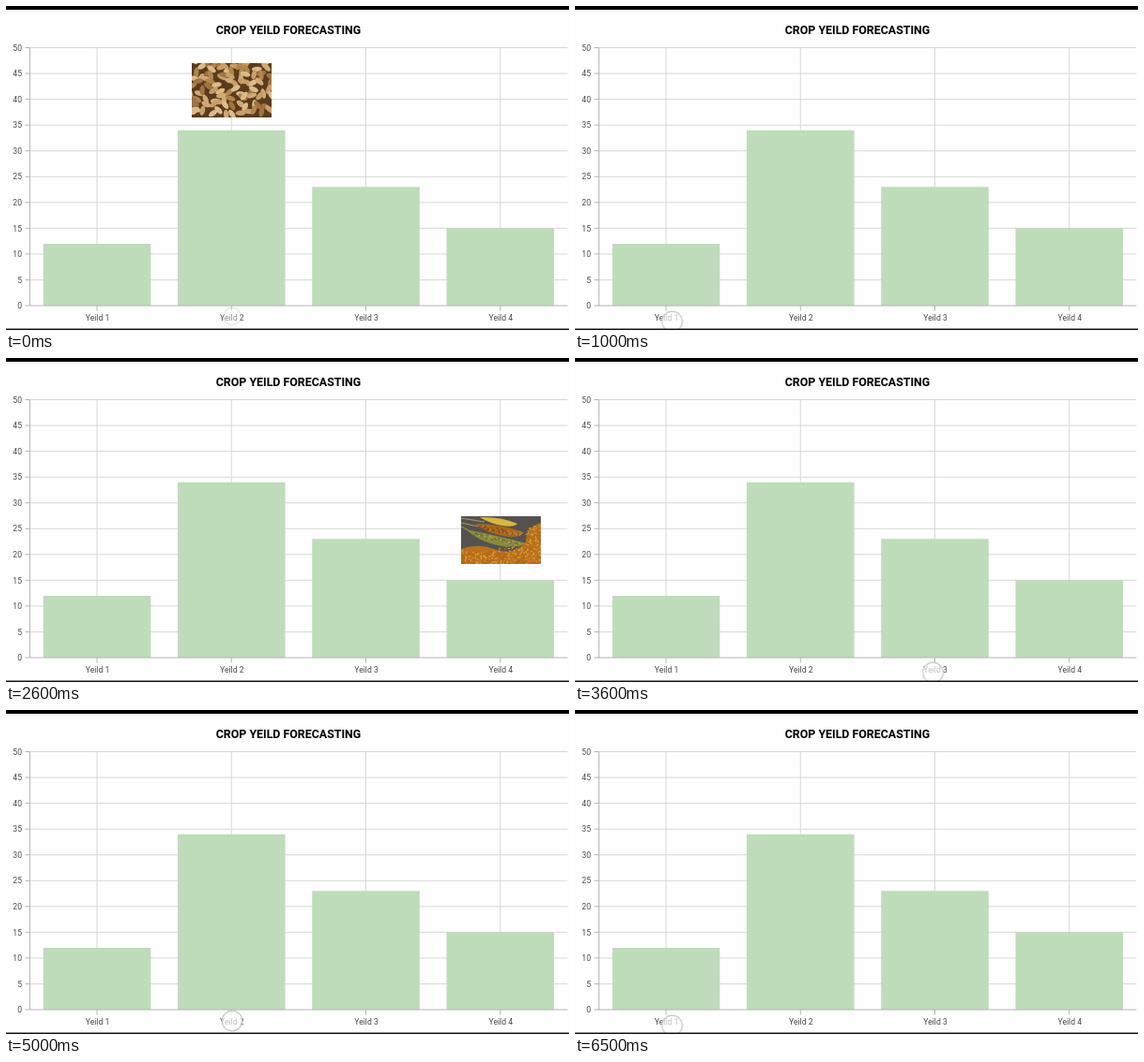
An HTML page for the animation above (6.6 s loop, 600 by 346 pixels).

```html
<!DOCTYPE html>
<html lang="en">
<head>
<meta charset="utf-8">
<title>Crop yeild forecasting</title>
<style>
  html, body { margin: 0; width: 100%; height: 100%; overflow: hidden; background: #fefefe; }
  svg { display: block; }
  text { font-family: Roboto, Arial, sans-serif; font-size: 8.6px; fill: #484848; }
  .title { font-size: 12.4px; font-weight: 700; fill: #000; }
  .grid { stroke: #d8d8d8; }
  .axis { stroke: #b4b4b4; }
  .bar { fill: #bedcba; }

  .photo, .touch { opacity: 0; animation: 6.6s -20ms step-end infinite; }
  #p1 { animation-name: show1; }
  #p2 { animation-name: show2; }
  #p3 { animation-name: show3; }
  #p4 { animation-name: show4; }
  .touch { animation-name: touch; }
  .touch circle { fill: #fff; fill-opacity: .66; stroke: #c6c6c6; stroke-width: 1.2; }

  @keyframes show1 { 0%, 36.36% { opacity: 0 } 16.66% { opacity: 1 } }
  @keyframes show2 { 0%, 78.78% { opacity: 1 } 13.63%, 96.96% { opacity: 0 } }
  @keyframes show3 { 0%, 75.75% { opacity: 0 } 57.57% { opacity: 1 } }
  @keyframes show4 { 0%, 54.54% { opacity: 0 } 39.39% { opacity: 1 } }
  @keyframes touch {
    0%     { opacity: .6; transform: translate(241px, 331.5px) scale(.85) }
    1.51%  { opacity: .3; transform: translate(241px, 331.5px) scale(.75) }
    3.03%  { opacity: 0 }
    13.63% { opacity: 1; transform: translate(103.5px, 337px) }
    19.69% { opacity: .6; transform: translate(103.5px, 337px) scale(.85) }
    21.21% { opacity: .3; transform: translate(103.5px, 337px) scale(.75) }
    22.72% { opacity: 0 }
    33.33% { opacity: 1; transform: translate(519px, 334px) }
    37.87% { opacity: .6; transform: translate(519px, 334px) scale(.85) }
    39.39% { opacity: 0 }
    54.54% { opacity: 1; transform: translate(381.5px, 336px) }
    59.09% { opacity: .6; transform: translate(381.5px, 336px) scale(.85) }
    60.6%  { opacity: 0 }
    75.75% { opacity: 1; transform: translate(241px, 332px) }
    80.3%  { opacity: .6; transform: translate(241px, 331.5px) scale(.85) }
    81.81% { opacity: .3; transform: translate(241px, 331.5px) scale(.75) }
    83.33% { opacity: 0 }
    96.96%, 100% { opacity: 1; transform: translate(103.5px, 337px) }
  }
</style>
</head>
<body>
<svg id="stage" width="100%" height="100%" viewBox="0 0 600 346">
  <rect width="600" height="346" fill="#fefefe"/>
  <text class="title" x="301" y="30" text-anchor="middle">CROP YEILD FORECASTING</text>
  <g id="chart"></g>

  <svg id="p1" class="photo" x="55" y="183" width="85" height="56">
    <rect width="85" height="56" fill="#9a6636"/>
    <g id="floor"></g>
    <path d="M34 0H85V34L80 44Q72 52 60 50Q42 46 33 28Q29 14 34 0Z" fill="#6d5c50"/>
    <path d="M62 0H85V16Q74 4 62 0Z" fill="#3a2d27"/>
    <path d="M34 3Q31 22 44 38Q56 50 71 46" fill="none" stroke="#a99a8c" stroke-width="3"/>
    <path d="M38 8Q58 -4 78 14" fill="none" stroke="#b3a496" stroke-width="4"/>
    <ellipse cx="59" cy="25" rx="20" ry="18" fill="#845228" transform="rotate(28 59 25)"/>
    <g id="sack"></g>
  </svg>

  <svg id="p2" class="photo" x="198" y="61" width="85" height="58">
    <rect width="85" height="58" fill="#5a3b1d"/>
    <g id="heap"></g>
  </svg>

  <svg id="p3" class="photo" x="341" y="127" width="85" height="48">
    <rect width="85" height="48" fill="#dfc7a0"/>
    <ellipse cx="47" cy="29" rx="32" ry="21" fill="#bea67f"/>
    <ellipse cx="46" cy="26" rx="31" ry="22.5" fill="#f1efeb"/>
    <ellipse cx="47" cy="26" rx="26" ry="18" fill="#8d4f32"/>
    <g id="bowl"></g>
    <path d="M8 34Q32 9 61 1" fill="none" stroke="#88984a" stroke-width="5"/>
    <path d="M16 22Q34 9 52 3" fill="none" stroke="#a9b56a" stroke-width="4"/>
    <g id="ear"></g>
  </svg>

  <svg id="p4" class="photo" x="485" y="169" width="85" height="51">
    <rect width="85" height="51" fill="#55524e"/>
    <path d="M0 35Q18 28 38 36Q58 42 69 27Q69 12 85 7V51H0Z" fill="#b9711c"/>
    <g id="spill"></g>
    <path d="M0 2L25 6M0 7L18 11M0 11L16 19" stroke="#a39a66"/>
    <path d="M20 1Q42 0 60 8Q56 12 44 10Q31 8 20 1Z" fill="#d9b63f"/>
    <path d="M15 8Q42 8 67 17Q64 23 50 22Q29 19 15 8Z" fill="#a9661f"/>
    <path d="M5 14Q36 20 70 29Q58 35 39 31Q19 27 5 14Z" fill="#8b8b3c"/>
    <g id="millet"></g>
  </svg>

  <g class="touch"><circle r="10.8"/></g>
  <rect width="600" height="4"/>
  <rect y="344.5" width="600" height="1.5" fill="#111"/>
</svg>

<script>
  const NS = 'http://www.w3.org/2000/svg';
  const byId = id => document.getElementById(id);

  function add(parent, tag, attrs, label) {
    const el = document.createElementNS(NS, tag);
    for (const key in attrs) el.setAttribute(key, attrs[key]);
    if (label !== undefined) el.textContent = label;
    parent.append(el);
  }

  // chart
  const chart = byId('chart');
  const left = 25.4, right = 598.4, base = 320, step = 143.25;
  const yOf = v => base - v * 5.51;
  const line = (cls, x1, y1, x2, y2) => add(chart, 'line', { class: cls, x1, y1, x2, y2 });

  for (let v = 0; v <= 50; v += 5) {
    const y = yOf(v);
    if (v) line('grid', left, y, right, y);
    line('axis', 20.5, y, left, y);
    add(chart, 'text', { x: 17, y: y + 3.2, 'text-anchor': 'end' }, v);
  }
  const yields = [12, 34, 23, 15];
  yields.forEach((v, i) => {
    const x = left + step * (i + 0.5);
    line('grid', x, yOf(50), x, base);
    line('axis', x, base, x, base + 5.5);
    add(chart, 'rect', { class: 'bar', x: x - 57.3, y: yOf(v), width: 114.6, height: base - yOf(v), rx: 0.8 });
    add(chart, 'text', { x: x + 0.5, y: 336, 'text-anchor': 'middle' }, 'Yeild ' + (i + 1));
  });
  line('axis', left, yOf(50), left, base);
  line('axis', left, base, right, base);

  // grain textures
  let seed = 7;
  const rnd = () => (seed = seed * 16807 % 2147483647) / 2147483647;

  function grain(g, x, y, size, colors) {
    add(g, 'ellipse', {
      rx: size, ry: size * 0.5,
      fill: colors[Math.floor(rnd() * colors.length)],
      transform: `translate(${x.toFixed(1)} ${y.toFixed(1)}) rotate(${Math.floor(rnd() * 180)})`
    });
  }

  function field(id, w, h, gap, size, colors, inside = () => true) {
    const g = byId(id);
    for (let y = 0; y <= h; y += gap)
      for (let x = 0; x <= w; x += gap) {
        const px = x + (rnd() - 0.5) * gap, py = y + (rnd() - 0.5) * gap;
        if (inside(px, py)) grain(g, px, py, size, colors);
      }
  }

  const oval = (cx, cy, rx, ry) => (x, y) => ((x - cx) / rx) ** 2 + ((y - cy) / ry) ** 2 < 1;

  field('floor', 85, 56, 4.4, 2.6, ['#c08a4e', '#d9a768', '#a87038', '#e0b57c']);
  field('sack', 85, 56, 3.8, 2.2, ['#c48d4e', '#d7a460', '#a56c34'], oval(59, 25, 18, 17));
  field('heap', 85, 58, 7.4, 5.4, ['#c79e66', '#b1854d', '#dabb8a', '#a07340', '#cfaa75']);
  field('bowl', 85, 48, 2.8, 1.3, ['#a9684a', '#bb7a58', '#7a4029'], oval(47, 26, 25, 17));
  field('spill', 85, 51, 3, 1.3, ['#d58d28', '#e3a43c', '#a9641a'],
    (x, y) => y > 35 + 4 * Math.sin(x / 12) || (x > 69 && y > 10));

  for (let i = 0; i < 40; i++) {
    const t = i / 39;
    grain(byId('ear'), 6 + 54 * t + rnd() * 4, 38 - 58 * t + 22 * t * t + rnd() * 6 - 3, 2, ['#76883c', '#b6c07c', '#93a454']);
    grain(byId('millet'), 22 + 42 * t, 12 + 7 * t + rnd() * 4 - 2, 1.2, ['#c58a30', '#7d4717']);
    grain(byId('millet'), 14 + 50 * t, 19 + 11 * t + rnd() * 4 - 2, 1.2, ['#a9a955', '#686b2c']);
  }
</script>
</body>
</html>
```
